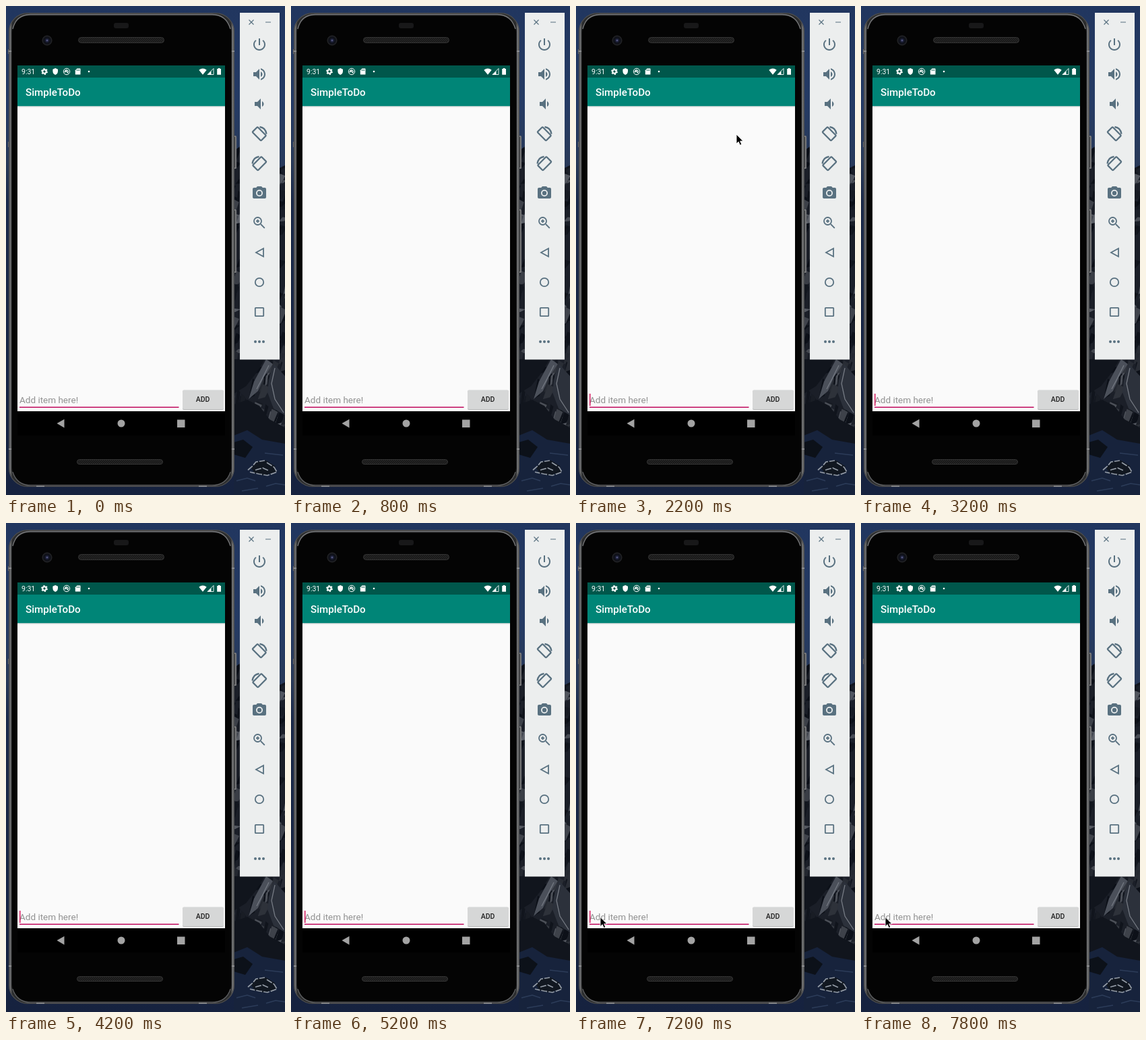
Write an HTML page that moves like this. It is 414x724 px and loops after 8000 ms.

```html
<!DOCTYPE html>
<html lang="en">
<head>
<meta charset="utf-8">
<title>To-do app in an emulator</title>
<style>
  html, body { margin: 0; width: 100%; height: 100%; overflow: hidden; background: #16213f; }
  svg { display: block; width: 414px; height: 724px; }
  text { font-family: Roboto, "Noto Sans", sans-serif; }
  .medium { font-weight: 500; }
  .line { fill: none; stroke: #597180; stroke-width: 1.8; }
  .thick { stroke-width: 2.3; }
</style>
</head>
<body>
<svg viewBox="0 0 414 724" xmlns="http://www.w3.org/2000/svg">
  <defs>
    <linearGradient id="sky" x2="0" y2="1">
      <stop offset="0" stop-color="#21365f"/>
      <stop offset=".2" stop-color="#253b64"/>
      <stop offset=".32" stop-color="#293a59"/>
      <stop offset=".4" stop-color="#1b2a4a"/>
      <stop offset="1" stop-color="#16223f"/>
    </linearGradient>
    <linearGradient id="edge">
      <stop offset="0" stop-color="#2c2d2e"/>
      <stop offset=".007" stop-color="#747576"/>
      <stop offset=".016" stop-color="#2c2d2e"/>
      <stop offset=".984" stop-color="#2c2d2e"/>
      <stop offset=".993" stop-color="#7c7d7e"/>
      <stop offset="1" stop-color="#303132"/>
    </linearGradient>
    <linearGradient id="shade" x2="0" y2="1">
      <stop offset="0" stop-color="#000" stop-opacity=".14"/>
      <stop offset="1" stop-color="#000" stop-opacity="0"/>
    </linearGradient>
    <radialGradient id="lens">
      <stop offset="0" stop-color="#7878a8"/>
      <stop offset=".25" stop-color="#20243f"/>
      <stop offset=".6" stop-color="#0c0e16"/>
      <stop offset="1" stop-color="#1c1d20"/>
    </radialGradient>
    <pattern id="mesh" width="3" height="3" patternUnits="userSpaceOnUse">
      <path d="M0 0h3v3H0z" fill="#171717"/>
      <path d="M0 3L3 0" stroke="#343434" stroke-width=".8"/>
    </pattern>
    <clipPath id="cliff"><path d="M338 215L347 208L406 240L414 236V724H338Z"/></clipPath>
  </defs>

  <!-- desktop -->
  <path d="M0 0h414v724H0z" fill="url(#sky)"/>
  <g clip-path="url(#cliff)">
    <path d="M338 200h76v524h-76z" fill="#1b1f28"/>
    <g id="rocks"></g>
    <path d="M346 523H384L371 544L356 563L338 574V523Z" fill="#11151d"/>
    <path d="M386 523L396 530L383 549L374 570L360 582L368 556Z" fill="#4b505a"/>
    <path d="M398 530L414 548V606L397 596L388 572L391 548Z" fill="#2c313b"/>
    <path d="M390 532L380 552L372 567M399 536L394 559L399 582L412 602" fill="none" stroke="#757a83" stroke-width="1.3"/>
    <path d="M338 590L358 583L376 592L391 612L414 624V650L338 646Z" fill="#11151d"/>
    <path d="M338 636L358 628L380 642L414 648V724H338Z" fill="#17233c"/>
    <path d="M338 646L352 642L366 653L355 669L338 664Z" fill="#0c1119"/>
    <path d="M342 703L358 699L370 703M386 711L400 707L414 709M350 718L374 714M384 662L411 665" fill="none" stroke="#2c3c59" stroke-width="1.6"/>
    <path d="M364 684L371 675L386 673L399 681L401 690L383 695L369 692Z" fill="#111720"/>
    <path d="M359 687L366 681L371 675L384 673M387 676L398 683L402 690L388 695L376 693L362 690M370 687L381 684L390 688" fill="none" stroke="#929aa5" stroke-width="1.7" stroke-dasharray="9 2"/>
  </g>

  <!-- phone -->
  <path d="M3 64h2v7H3zM3 201h2v8H3z" fill="#666"/>
  <rect x="337" y="192" width="5" height="49" rx="1.5" fill="#77787a"/>
  <rect x="337" y="301" width="5" height="94" rx="1.5" fill="#77787a"/>
  <path d="M339.4 194v45M339.4 303v90" stroke="#303234"/>
  <rect x="4" y="10" width="335" height="702" rx="28" fill="url(#edge)"/>
  <rect x="4.6" y="10.600" width="333.800" height="700.800" rx="27.500" fill="none" stroke="#4d4e50" stroke-width="1.2"/>
  <path d="M4 67h4M335 67h4M4 656h4M335 656h4M45 711h12M286 711h12" stroke="#8b8c8e" stroke-width="2"/>
  <rect x="8.500" y="14" width="326" height="694.500" rx="25" fill="#040404" stroke="#202122"/>
  <path d="M10 34Q15 13 36 12.500H306Q327 13 333 34" fill="none" stroke="#77787a" stroke-width="1.300"/>
  <path d="M10 690Q16 709 36 710H306Q327 709 333 690" fill="none" stroke="#626365" stroke-width="1.200"/>
  <rect x="160" y="25" width="22" height="8" rx="3" fill="#181819"/>
  <circle cx="61" cy="51" r="7" fill="url(#lens)" stroke="#27282b"/>
  <rect x="107.500" y="46.500" width="127" height="8" rx="4" fill="url(#mesh)" stroke="#343434"/>
  <rect x="105.500" y="671.500" width="127" height="7" rx="3.500" fill="url(#mesh)" stroke="#343434"/>

  <!-- app -->
  <path d="M17 88h308v548H17z"/>
  <path d="M17 88h308v512H17z" fill="#fafafa"/>
  <path d="M17 88h308v18H17z" fill="#00574b"/>
  <path d="M17 106h308v42.300H17z" fill="#008577"/>
  <path d="M17 148.300h308v2.500H17z" fill="url(#shade)"/>
  <g fill="#fff">
    <text x="23" y="101" font-size="10.500">9:31</text>
    <text x="29" y="133" font-size="15.200" class="medium">SimpleToDo</text>
    <circle cx="57" cy="97" r="2.700" fill="none" stroke="#fff" stroke-width="2"/>
    <circle cx="57" cy="97" r="4.200" fill="none" stroke="#fff" stroke-width="1.500" stroke-dasharray="2.200 2.198"/>
    <path d="M73.200 92L77 93.700V96.500Q77 100.500 73.200 102Q69.400 100.500 69.400 96.500V93.700Z"/>
    <g fill="none" stroke="#fff">
      <circle cx="90" cy="97" r="4.700"/>
      <path d="M87.500 98.500A2.600 2.600 0 1 1 92.500 97.700M88 95L92.500 99.500M90 97h-2.500" stroke-width="1.200"/>
    </g>
    <path d="M105.500 92.500H110Q110.500 92.500 110.500 93V101Q110.500 101.500 110 101.500H103.300Q102.800 101.500 102.800 101V95.200Z"/>
    <path d="M105 94.300v1.800M106.800 94v2.100M108.600 94v2.100" stroke="#00574b" stroke-width=".8"/>
    <circle cx="123" cy="97" r="1.300"/>
    <path d="M286.300 94.700Q292 90.500 297.700 94.700L292 101.800Z"/>
    <path d="M308 92.500V101.500H299Z" fill="none" stroke="#fff" stroke-width=".9"/>
    <path d="M304.500 96.300V101.500H299.300Z"/>
    <path d="M314.800 92h2.600v1h1.600v8.800h-5.800V93h1.600z"/>
  </g>
  <text x="20" y="588" font-size="13.500" fill="#929292">Add item here!</text>
  <path d="M20 593.200h236.500v1.700H20z" fill="#c72a72"/>
  <path id="caret" d="M20 574h1.500v18H20z" fill="#d81b60"/>
  <rect x="262" y="569.500" width="61" height="28.500" rx="2" fill="#b9babb"/>
  <rect x="262" y="568.500" width="61" height="28.500" rx="2" fill="#d6d7d7"/>
  <text x="292" y="586" font-size="10.500" text-anchor="middle" class="medium" fill="#202020">ADD</text>
  <g fill="#a3a3a3">
    <path d="M75.500 618L86.500 611.800V624.500Z"/>
    <circle cx="171" cy="618" r="5.500"/>
    <path d="M254 612.500h11.500v11.500H254z"/>
  </g>

  <!-- emulator controls -->
  <path d="M347 10h59v513.500h-59z" fill="#eceeee"/>
  <path d="M360.500 20.500l7 7m0-7l-7 7M385 24h8" class="line" style="stroke-width:1.200"/>
  <g id="tools" fill="#597180"></g>

  <path id="mouse" d="M0 0V14L3.200 11L5.300 16L7.800 15L5.700 10.100H10Z" fill="#000" stroke="#fff" stroke-width=".9"/>
</svg>
<script>
  const $ = id => document.getElementById(id);

  // Icons on a 24 px grid, one every 44 px
  const path = d => `<path d="${d}"/>`;
  const line = (d, extra = "") => `<path class="line ${extra}" d="${d}"/>`;
  const turn = line("M12.500 2Q21 3 22.500 12.500", "thick")
    + line("M2.300 8.900L8.400 2.800Q9.200 2 10 2.800L21.200 14Q22 14.800 21.200 15.600L15.100 21.700Q14.300 22.500 13.500 21.700L2.300 10.500Q1.500 9.700 2.300 8.900Z", "thick");
  const icons = [
    path("M13 3h-2v10h2V3zm4.830 2.170l-1.420 1.420C17.990 7.860 19 9.810 19 12c0 3.870-3.130 7-7 7s-7-3.130-7-7c0-2.190 1.010-4.140 2.580-5.420L6.170 5.170C4.230 6.820 3 9.260 3 12c0 4.970 4.030 9 9 9s9-4.030 9-9c0-2.740-1.230-5.180-3.170-6.830z"),
    path("M3 9v6h4l5 5V4L7 9H3zm13.500 3c0-1.770-1.020-3.290-2.500-4.030v8.050c1.480-.73 2.500-2.250 2.500-4.020zM14 3.230v2.060c2.890.86 5 3.540 5 6.710s-2.110 5.850-5 6.710v2.060c4.010-.91 7-4.490 7-8.770s-2.990-7.860-7-8.770z"),
    path("M18.500 12c0-1.770-1.020-3.290-2.500-4.030v8.050c1.480-.73 2.500-2.250 2.500-4.020zM5 9v6h4l5 5V4L9 9H5z"),
    turn,
    `<g transform="matrix(-1 0 0 1 24 0)">${turn}</g>`,
    path("M9 2L7.170 4H4c-1.100 0-2 .9-2 2v12c0 1.100.9 2 2 2h16c1.100 0 2-.9 2-2V6c0-1.100-.9-2-2-2h-3.170L15 2H9zm3 15a5 5 0 1 1 0-10 5 5 0 1 1 0 10z")
      + '<circle cx="12" cy="12" r="3.200"/>',
    '<circle class="line" cx="9.500" cy="9.500" r="5.500"/>' + line("M14 14L19.800 19.800") + line("M9.500 7v5M7 9.500h5"),
    line("M7 12L18 6V18Z"),
    '<circle class="line" cx="12" cy="12" r="6.200"/>',
    '<rect class="line" x="5.800" y="5.800" width="12.400" height="12.400" rx=".8"/>',
    [6, 12, 18].map(x => `<circle cx="${x}" cy="12" r="2"/>`).join("")
  ];
  $("tools").innerHTML = icons
    .map((icon, i) => `<g transform="translate(364 ${45 + i * 44})">${icon}</g>`).join("");

  // Seeded facets for the cliff, a few of them catching the light
  let seed = 7;
  const rand = () => (seed = seed * 16807 % 2147483647) / 2147483647;
  let facets = "";
  for (let i = 0; i < 240; i++) {
    const x = 334 + rand() * 84, y = 205 + rand() * 440;
    const w = 3 + rand() * 9, h = 4 + rand() * 16;
    const lit = 12 + rand() ** 3 * 85 | 0;
    facets += `<path d="M${x} ${y}l${w} ${h * .3}l${-w * .7} ${h}l${-w} ${h * .2}z" fill="rgb(${lit},${lit + 4},${lit + 12})"/>`;
  }
  $("rocks").innerHTML = facets;

  // Pointer: time, x, y; no position means hidden
  const LOOP = 8000;
  const stops = [
    [0], [2000, 345.500, 119], [2200, 238, 190], [2600, 180.500, 264.500], [2800, 151.500, 301.500],
    [3000], [5800, 1.500, 564.500], [6000, .5, 590], [6200, 36, 583.500]
  ];
  const start = performance.now();

  function draw() {
    const t = (performance.now() - start) % LOOP;
    const [, x, y] = stops.filter(s => s[0] <= t).pop();
    const caretOn = (t + 800) % 1000 < 600;
    $("caret").setAttribute("visibility", caretOn ? "visible" : "hidden");
    $("mouse").setAttribute("visibility", x === undefined ? "hidden" : "visible");
    if (x !== undefined) $("mouse").setAttribute("transform", `translate(${x} ${y})`);
    requestAnimationFrame(draw);
  }
  draw();
</script>
</body>
</html>
```
